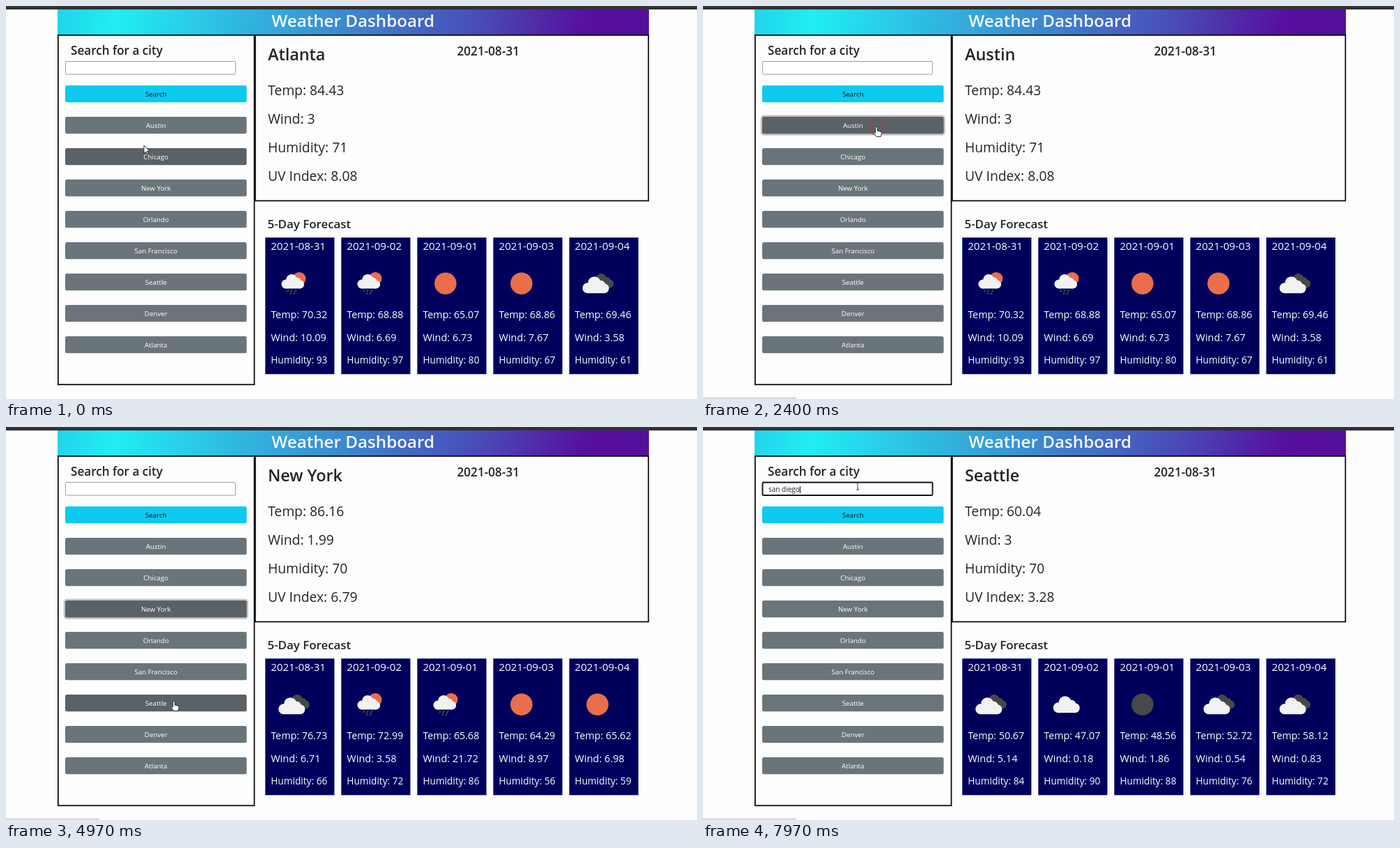
Write an HTML page that moves like this. It is 992 px wide and 564 px high and loops after 8000 ms.

```html
<!DOCTYPE html>
<html lang="en">
<head>
<meta charset="utf-8">
<title>Weather Dashboard</title>
<style>
  html, body { margin: 0; width: 100%; height: 100%; overflow: hidden; background: #fdfdfd; }
  svg { position: absolute; left: 0; top: 0; font-family: "Open Sans", "Noto Sans", sans-serif; }
  #banner {
    position: absolute; left: 74px; top: 5px; width: 849px; height: 36px;
    background: linear-gradient(105deg, #22d3ea 0, #20eef3 10%, #3a92d3 45%, #4a4bb8 71%, #560f9e 89%, #55109a 100%);
  }
  .semi { font-weight: 600; }
  .mid { text-anchor: middle; font-size: 9.75px; }
</style>
</head>
<body>
<div id="banner"></div>
<svg id="stage" width="992" height="564" viewBox="0 0 992 564"></svg>
<script>
const LOOP = 8000;
const INK = '#212529', DARK = '#484848', SUN = '#eb6e4b', CLOUD = '#f2f2f2';
const CITIES = ['Austin', 'Chicago', 'New York', 'Orlando', 'San Francisco', 'Seattle', 'Denver', 'Atlanta'];
const DATES = ['2021-08-31', '2021-09-02', '2021-09-01', '2021-09-03', '2021-09-04'];
const QUERY = 'san diego', TYPE_START = 7050, TYPE_STEP = 105;

// Each step holds from its time until the next one.
const TITLES = [[0, 'Atlanta'], [2350, 'Austin'], [3700, 'New York'], [5150, 'Seattle']];
const CURRENT = [[0, [84.43, 3, 71]], [2530, [88.09, 4, 62]], [3850, [86.16, 1.99, 70]], [5300, [60.04, 3, 70]]];
const FORECAST = [
  [0, { uv: 8.08, icons: 'rrssb', temp: [70.32, 68.88, 65.07, 68.86, 69.46],
    wind: [10.09, 6.69, 6.73, 7.67, 3.58], hum: [93, 97, 80, 67, 61] }],
  [2660, { uv: 3.45, icons: 'bmmmc', temp: [82.72, 79.16, 77.76, 77.7, 76.8],
    wind: [5.1, 4.14, 5.08, 4.5, 3.74], hum: [65, 78, 88, 84, 80] }],
  [3980, { uv: 6.79, icons: 'brrss', temp: [76.73, 72.99, 65.68, 64.29, 65.62],
    wind: [6.71, 3.58, 21.72, 8.97, 6.98], hum: [66, 72, 86, 56, 59] }],
  [5430, { uv: 3.28, icons: 'bcmbb', temp: [50.67, 47.07, 48.56, 52.72, 58.12],
    wind: [5.14, 0.18, 1.86, 0.54, 0.83], hum: [84, 90, 88, 76, 72] }]
];
const FOCUS = [[0, null], [2330, 0], [3680, 2], [5130, 5], [6750, 'input']];
const CLICKS = [2330, 3680, 5130, 6750];

// Pointer path: time, x, y
const PATH = [
  [0, 198, 200], [400, 200, 197], [1170, 203, 195], [1550, 210, 193], [2050, 247, 176],
  [2250, 249, 174], [2700, 249, 174], [3450, 244, 255], [3870, 244, 255], [4250, 244, 262],
  [4700, 241, 388], [4970, 241, 394], [5400, 241, 394], [6150, 222, 93], [6370, 221, 90], [7970, 222, 85]
];

const rect = (x, y, w, h, attrs) => `<rect x="${x}" y="${y}" width="${w}" height="${h}" ${attrs}/>`;
const circle = (x, y, r, fill) => `<circle cx="${x}" cy="${y}" r="${r}" fill="${fill}"/>`;
const text = (x, y, size, str, attrs = '') =>
  `<text x="${x}" y="${y}" font-size="${size}" fill="${INK}" ${attrs}>${str}</text>`;

const cloud = (x, y, scale, fill) => `<g transform="translate(${x} ${y}) scale(${scale})">` +
  circle(-11.5, 4.5, 7.5, fill) + circle(-2, -3, 9, fill) + circle(7, 0, 6.5, fill) +
  circle(12, 5, 7, fill) + rect(-11.5, 2, 23.5, 10, `fill="${fill}"`) + '</g>';

const ICONS = {
  s: circle(0, 0, 15.8, SUN),
  m: circle(0, 0, 15.8, DARK),
  c: cloud(0, 0, 1, CLOUD),
  b: cloud(7, -4, 0.85, DARK) + cloud(-2.5, 2, 1, CLOUD),
  r: circle(8.3, -7, 9.3, SUN) + cloud(-1, -3, 0.86, CLOUD) +
    `<path d="M-7 9l-2 3M-2 9l-2 3M4 9l-2 3M-3 13l-1.5 2.5M2 13l-1.5 2.5" stroke="${DARK}" stroke-width="2"/>`
};

const buttonY = i => 159 + 45 * i;

function buttons() {
  return CITIES.map((name, i) =>
    rect(82.7, buttonY(i) - 2.4, 265, 29.2, 'rx="4.5" fill="#c1c4c6" class="ring"') +
    rect(85, buttonY(i), 260.5, 24.3, 'rx="2.5" class="btn"') +
    `<text x="215.3" y="${buttonY(i) + 15.7}" class="mid" fill="#fff">${name}</text>`).join('');
}

function cards(data) {
  return DATES.map((date, i) => {
    const line = (y, size, str) => `<text x="8" y="${y}" font-size="${size}">${str}</text>`;
    return `<g transform="translate(${372.2 + 109.1 * i} 0)" fill="#fff">` +
      rect(0, 332.3, 99.2, 196, 'fill="#00005c"') + line(350, 15.1, date) +
      `<g transform="translate(40.5 398.2)">${ICONS[data.icons[i]]}</g>` +
      line(448, 14.3, `Temp: ${data.temp[i]}`) + line(481.3, 14.5, `Wind: ${data.wind[i]}`) +
      line(513, 13.7, `Humidity: ${data.hum[i]}`) + '</g>';
  }).join('');
}

const frame = 'fill="none" stroke="#000" stroke-width="1.7"';
const stage = document.getElementById('stage');
stage.innerHTML =
  rect(0, 0, 992, 5, 'fill="#333"') +
  '<text x="498.2" y="30.3" font-size="24.2" class="semi" text-anchor="middle" fill="#f4f8ff">Weather Dashboard</text>' +
  rect(74.8, 41.8, 281.7, 501.5, frame) + rect(357.8, 41.8, 564.5, 237.7, frame) +
  text(93, 70.3, 17.1, 'Search for a city', 'class="semi"') +
  rect(85.5, 79.5, 244, 18.5, 'id="field" rx="1.5" fill="#fff"') +
  text(94, 92.6, 10, '', 'id="query"') +
  rect(0, 85, 1, 10, 'id="caret" fill="#000"') +
  rect(85, 114, 260.5, 24.3, 'rx="2.5" fill="#0dcaf0"') +
  `<text x="215.3" y="129.7" class="mid" fill="#111">Search</text>` + buttons() +
  text(376, 78, 23.4, '', 'id="city" class="semi"') +
  text(647.5, 70.5, 17.2, DATES[0], 'class="semi"') +
  ['temp', 'wind', 'hum', 'uv'].map((id, i) => text(376, 128 + 41.1 * i, 19.3, '', `id="${id}"`)).join('') +
  text(375.5, 318.8, 16.9, '5-Day Forecast', 'class="semi"') +
  '<g id="cards"></g>' +
  rect(0, 561.5, 134, 4, 'id="status" rx="1" fill="#d8d5e2"') +
  '<circle id="click" fill="none" stroke="#c8323c" stroke-width="1.1"/>' +
  `<g id="pointer" stroke-linejoin="round">
    <path id="arrow" d="M0 0V11.5L2.6 9 4.4 13 6.2 12.2 4.5 8.3H8Z" fill="#fff" stroke="#222" stroke-width=".9"/>
    <path id="hand" d="M-1.3 0Q0 -1.6 1.3 0V5L6 6.2Q7.5 6.6 7.3 8.5L6.3 13.5H0L-4 8.5Q-3.6 6.8 -1.3 8.2Z" fill="#fff" stroke="#222" stroke-width=".9"/>
    <path id="beam" d="M-2 -5H2M0 -5V5M-2 5H2" fill="none" stroke="#333" stroke-width="1"/>
  </g>`;

const el = id => document.getElementById(id);
const ringEls = [...document.querySelectorAll('.ring')];
const btnEls = [...document.querySelectorAll('.btn')];
const show = (node, on) => node.setAttribute('visibility', on ? 'visible' : 'hidden');
const setText = (id, str) => { if (el(id).textContent !== str) el(id).textContent = str; };
const stepAt = (steps, t) => steps.filter(s => s[0] <= t).pop()[1];

function pointerAt(t) {
  const next = PATH.findIndex(p => p[0] > t);
  if (next < 0) return PATH[PATH.length - 1].slice(1);
  const [t0, x0, y0] = PATH[next - 1], [t1, x1, y1] = PATH[next];
  const k = (t - t0) / (t1 - t0), e = k * k * (3 - 2 * k);
  return [x0 + (x1 - x0) * e, y0 + (y1 - y0) * e];
}

let shown = null;

function draw(t) {
  const [x, y] = pointerAt(t);
  const focus = stepAt(FOCUS, t), data = stepAt(FORECAST, t), [temp, wind, hum] = stepAt(CURRENT, t);

  setText('city', stepAt(TITLES, t));
  setText('temp', `Temp: ${temp}`);
  setText('wind', `Wind: ${wind}`);
  setText('hum', `Humidity: ${hum}`);
  setText('uv', `UV Index: ${data.uv}`);
  if (data !== shown) el('cards').innerHTML = cards(shown = data);

  const over = CITIES.findIndex((_, i) => y >= buttonY(i) && y <= buttonY(i) + 24.5);
  btnEls.forEach((btn, i) => {
    const lit = i === over || i === focus || (i === 1 && t < 120);
    btn.setAttribute('fill', lit ? '#5a6167' : '#6a757b');
    show(ringEls[i], i === focus);
  });

  const typing = focus === 'input';
  const count = Math.max(0, Math.min(QUERY.length, Math.floor((t - TYPE_START) / TYPE_STEP) + 1));
  setText('query', QUERY.slice(0, count));
  el('field').setAttribute('stroke', typing ? '#101020' : '#9c9ca4');
  el('field').setAttribute('stroke-width', typing ? 1.9 : 1);
  const width = count ? el('query').getComputedTextLength() : 0;
  el('caret').setAttribute('x', 94 + width);
  show(el('caret'), typing);
  show(el('status'), t >= 430);

  const inField = y > 79 && y < 98;
  el('pointer').setAttribute('transform', `translate(${x} ${y})`);
  show(el('beam'), inField);
  show(el('hand'), !inField && over >= 0);
  show(el('arrow'), !inField && over < 0);

  const age = t - (CLICKS.filter(c => c <= t).pop() ?? -LOOP);
  const ring = el('click');
  show(ring, age < 160);
  ring.setAttribute('cx', x + 0.5);
  ring.setAttribute('cy', y + 1);
  ring.setAttribute('r', 7 + Math.min(age, 160) / 24);
}

function tick() {
  draw(performance.now() % LOOP);
  requestAnimationFrame(tick);
}
tick();
</script>
</body>
</html>
```
